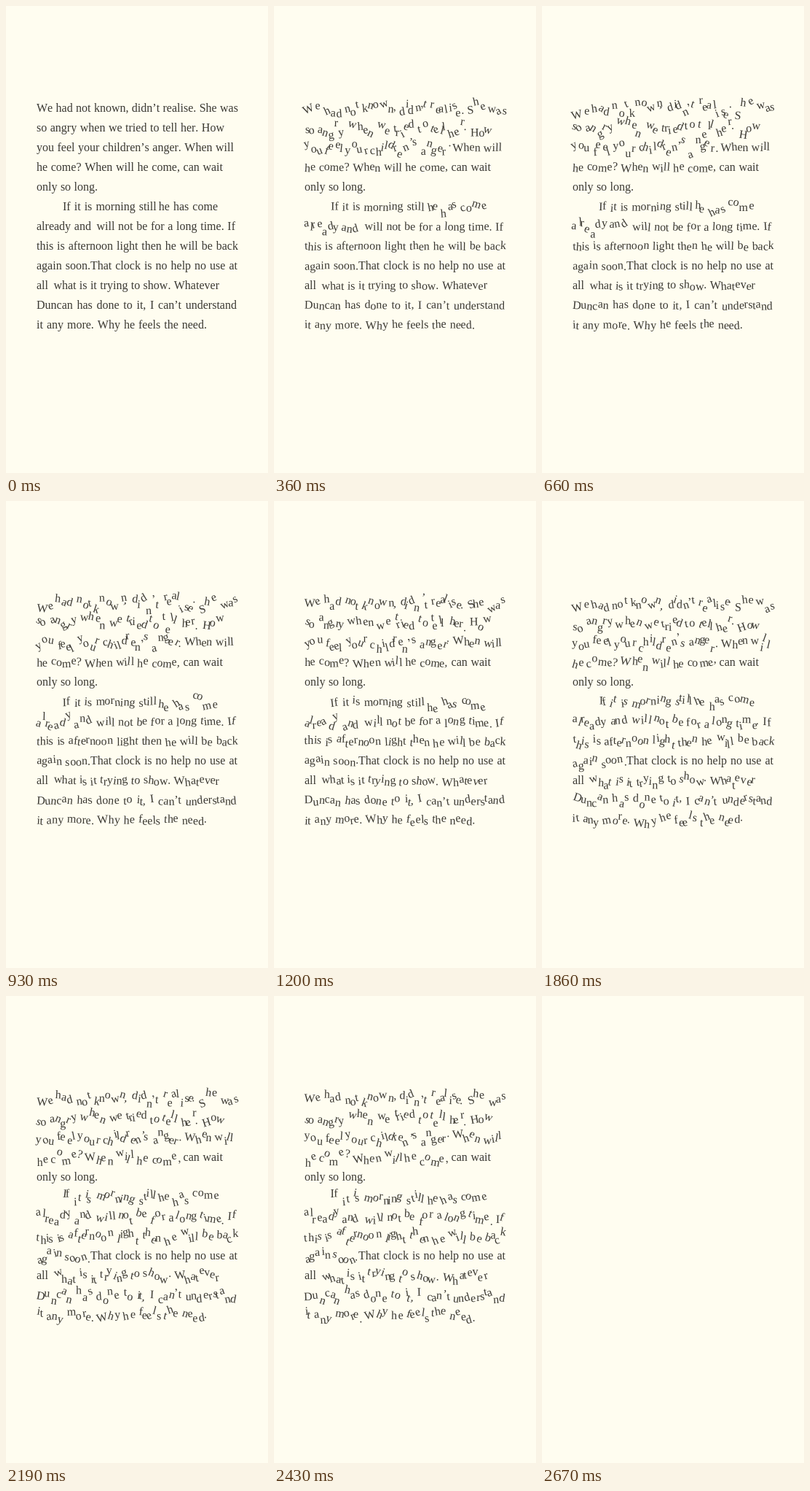
Write an HTML page that moves like this. It is 360 by 640 pixels and loops after 2700 ms.

```html
<!DOCTYPE html>
<html lang="en">
<head>
<meta charset="utf-8">
<title>Drifting letters</title>
<style>
  html, body { margin: 0; width: 100%; height: 100%; overflow: hidden; background: #fffdf0; }
  #page {
    position: absolute; left: 0; top: 0; width: 360px; height: 640px; overflow: hidden;
    font: 16px/27px "Liberation Serif", "Times New Roman", serif; color: #3b3933;
  }
  .line { position: absolute; display: flex; justify-content: space-between; white-space: nowrap; }
  .line i { display: inline-block; font-style: normal; transform-origin: 50% 57%; }
  .wide { margin-left: 3px; }
  .tight { margin-left: -2px; }
</style>
</head>
<body>
<div id="page"></div>
<script>
const LOOP = 2700, STEP = 30, BLANK = 2670;
const TOP = 126, LEADING = 27;

// Marks: [ restless letters, { slowly waking letters, ] still letters; ~ wide gap, | tight gap
const LINES = [
  [42, 319, "[We had not known, didn’t realise. She was"],
  [42, 300, "so angry when we tried to tell her. How"],
  [42, 313, "you feel your children’s anger. {When will"],
  [42, 298, "he come? When will he come, ]can wait"],
  [42, 126, "only so long."],
  [78, 291, "{If it is morning still|[he has come"],
  [42, 315, "already and~{will not be for a long time. If"],
  [42, 319, "this is afternoon light then he will be back"],
  [42, 318, "again soon.]That clock is no help no use at"],
  [42, 293, "all~{what is it trying to show. Whatever"],
  [42, 317, "Duncan has done to it, I can’t understand"],
  [42, 276, "it any more. Why he feels the need."]
];

const page = document.getElementById("page");
const letters = [];
let seed = 4127;

function random() {
  seed = (seed * 16807) % 2147483647;
  return seed / 2147483647;
}

// A smooth wander around a fixed lean, within about -1..1
function wander() {
  const lean = random() * 2 - 1;
  const speed = Math.PI * 2 * (0.4 + random() * 0.55);
  const phase = random() * Math.PI * 2;
  return s => 0.5 * lean + 0.58 * Math.sin(speed * s + phase);
}

function add(parent, tag, cls) {
  const el = document.createElement(tag);
  if (cls) el.className = cls;
  return parent.appendChild(el);
}

function build() {
  let mode = "]";
  LINES.forEach(([left, right, text], row) => {
    const line = add(page, "div", "line");
    line.style.cssText = `left:${left}px;width:${right - left}px;top:${TOP + row * LEADING}px`;
    let word = add(line, "span");
    for (const ch of text) {
      if ("[{]".includes(ch)) mode = ch;
      else if (" ~|".includes(ch)) word = add(line, "span", { "~": "wide", "|": "tight" }[ch]);
      else {
        const el = add(word, "i");
        el.textContent = ch;
        if (mode !== "]") letters.push({ el, hot: mode === "[", x: wander(), y: wander(), turn: wander() });
      }
    }
  });
}

const ease = u => { u = Math.min(1, Math.max(0, u)); return u * u * (3 - 2 * u); };
const hotAmp = t => 10.5 * ease(t / 480) - 3 * ease((t - 600) / 1200);
const coldAmp = t => 1.8 * Math.min(1, t / 600) + 5.5 * ease((t - 600) / 1700);

function draw(t) {
  page.style.visibility = t >= BLANK ? "hidden" : "visible";
  const s = t / 1000, hot = hotAmp(t), cold = coldAmp(t);
  for (const l of letters) {
    const a = l.hot ? hot : cold;
    const x = a * 0.22 * l.x(s), y = a * l.y(s), turn = a * 3 * l.turn(s);
    l.el.style.transform = `translate(${x.toFixed(2)}px,${y.toFixed(2)}px) rotate(${turn.toFixed(2)}deg)`;
  }
}

build();
const start = performance.now();
function tick() {
  const t = (performance.now() - start) % LOOP;
  draw(Math.floor(t / STEP) * STEP);
  requestAnimationFrame(tick);
}
tick();
</script>
</body>
</html>
```
